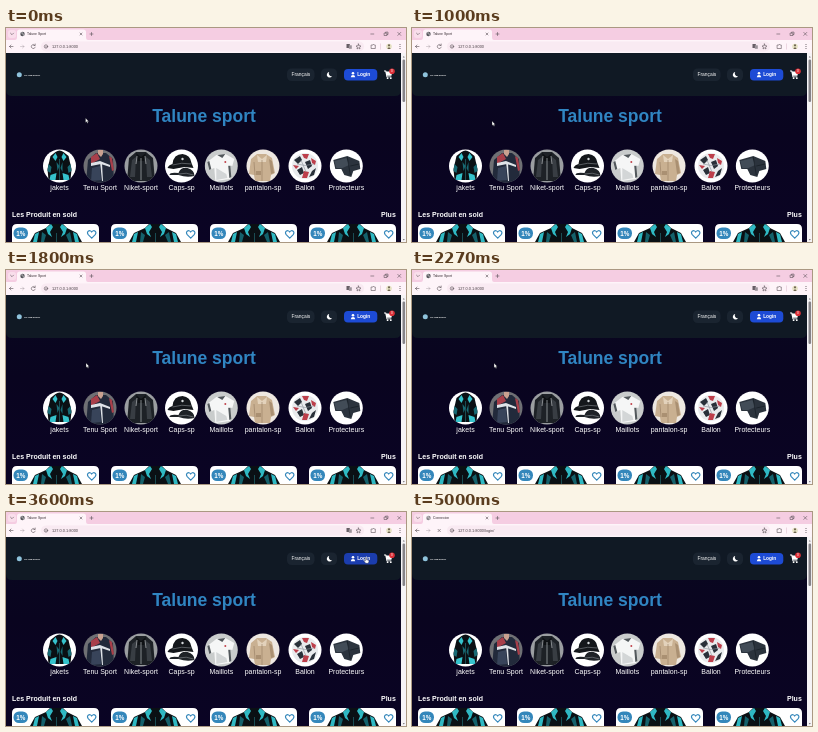
Animation of 400 by 214 pixels, one loop 5070 ms. Source, as an HTML page:

```html
<!DOCTYPE html>
<html lang="fr">
<head>
<meta charset="utf-8">
<title>Talune Sport</title>
<style>
html, body { margin: 0; width: 100%; height: 100%; overflow: hidden; background: #09041f; }
svg { display: block; width: 100vw; height: 100vh; }
text { font-family: "Liberation Sans", Arial, sans-serif; }
.line { fill: none; stroke: #5d5259; stroke-width: .6; stroke-linecap: round; stroke-linejoin: round; }
.label { font-size: 7px; fill: #fff; text-anchor: middle; }
.bold { font-weight: bold; fill: #fff; }
</style>
</head>
<body>
<svg viewBox="0 0 400 214" preserveAspectRatio="none">
  <defs>
    <linearGradient id="page" x2="0" y2="1">
      <stop offset="0" stop-color="#090820"/>
      <stop offset=".5" stop-color="#09041f"/>
      <stop offset="1" stop-color="#0a0424"/>
    </linearGradient>
    <clipPath id="round"><circle r="16.5"/></clipPath>

    <g id="hoodie">
      <rect x="-17" y="-17" width="34" height="34" fill="#fff"/>
      <path fill="#0a1014" d="M-4-14Q0-17 4-14L9-10 12 3 11 14H-11L-12 3-9-10Z"/>
      <path fill="#35c3cc" d="M-4-13L-2-9-4-5-7-9ZM4-13L2-9 4-5 7-9ZM-9 9L-3 7-4 14H-10ZM9 9L3 7 4 14H10Z"/>
      <path fill="#176a74" d="M-11-2L-8 1-9 7-12 5ZM11-2L8 1 9 7 12 5ZM-3-4L0 0-2 5ZM3-4L1 2 3 6Z"/>
      <path stroke="#2b8a92" stroke-width=".5" d="M0-7V14"/>
    </g>
    <g id="tracksuit">
      <rect x="-17" y="-17" width="34" height="34" fill="#6f7074"/>
      <path fill="#222a3b" d="M-4-13H6L13-7 14 17H-14L-12-6Z"/>
      <path fill="#a83f4a" d="M-9-9L-3-13 0-7-9-2ZM9-10L12-8 14 4 12 5Z"/>
      <path fill="#dfe3e8" d="M-9-3L0-5 10-1 10 1 1-2-9 0ZM0-4L2-3 3 15H2Z"/>
      <path fill="#38445a" d="M-8 2L0 0 1 14-9 15Z"/>
      <path fill="#c9a190" d="M-2-16H3V-12L1-9-2-12Z"/>
    </g>
    <g id="jacket">
      <rect x="-17" y="-17" width="34" height="34" fill="#9b9ea1"/>
      <path fill="#1d2126" d="M-5-14H5L12-8 14 15H-14L-12-8Z"/>
      <path fill="#383d43" d="M-9-6L-5-9-6 11-11 11ZM5-9L9-6 11 11 6 11Z"/>
      <path fill="#0e1114" d="M-5-13L0-9 5-13 3-5H-3Z"/>
      <path fill="none" stroke="#b7bbbe" stroke-width=".7" d="M0-8V14M-4-10L-5-2M4-10L5-2"/>
    </g>
    <g id="cap">
      <rect x="-17" y="-17" width="34" height="34" fill="#fff"/>
      <path fill="#14171b" d="M-9-2Q-8-12 1-12 9-11 10-3L12 2 3 1-8 3-14 2Q-13-1-9-2Z"/>
      <path fill="#1e2227" d="M-3 7Q-1 1 6 2 13 4 13 10 5 12-3 9L-12 9Q-12 6-3 7Z"/>
      <path fill="none" stroke="#858a8f" stroke-width=".6" d="M-9-1Q0-4 10-2M-3 8Q5 6 12 9"/>
      <circle cx="1" cy="-7" r="1.2" fill="#d5d9dc"/>
    </g>
    <g id="shirt">
      <rect x="-17" y="-17" width="34" height="34" fill="#c9cccc"/>
      <path fill="#f5f6f6" d="M-5-11L4-12 13-7 11 0 7-1 9 13-6 15-7 2-12 4-14-4Z"/>
      <path fill="#52585c" d="M-4-11L4-12 1-8ZM-14-4L-12 4-10 3-12-5ZM7 0L8 12 10 11 9 0Z"/>
      <path fill="#d3d6d7" d="M-5 2L5 8 6 12-5 14Z"/>
      <circle cx="4" cy="-4" r="1" fill="#c0434c"/>
    </g>
    <g id="beige">
      <rect x="-17" y="-17" width="34" height="34" fill="#eee8e1"/>
      <path fill="#c9b091" d="M-6-12H3L9-8 12 7 8 9 7 15H-8L-9 9-14 8-12-7Z"/>
      <path fill="#e3d2bb" d="M-6-11L-1-7 4-11 3-4-5-4Z"/>
      <path fill="#aa9072" d="M6-7L9-5 11 7 8 8ZM-7 5H-2V9H-7Z"/>
      <path fill="none" stroke="#957d62" stroke-width=".6" d="M-1-6V15M-9-4L-8 9"/>
    </g>
    <g id="ball">
      <rect x="-17" y="-17" width="34" height="34" fill="#fff"/>
      <circle r="13" fill="#e9ebed"/>
      <path fill="#293039" d="M-11-6L-5-10-3-6-7-2ZM0-4L5-6 7 0 3 3ZM-8 4L-3 1-1 7-5 9ZM7 5L11 2 9 9 4 11Z"/>
      <path fill="#bd3f4b" d="M-3-12L4-12 2-7-1-8ZM6-8L11-5 10-1 7-3ZM-12-1L-6 0-9 3ZM-1 5L4 6 2 12-3 12Z"/>
      <path fill="none" stroke="#8b929b" stroke-width=".6" d="M-4-6L1 6M-8-2Q0 1 9-2"/>
    </g>
    <g id="guard">
      <rect x="-17" y="-17" width="34" height="34" fill="#fff"/>
      <path fill="#2b333d" d="M-13-6L1-10 13-5 14 3 7 5 5 11-2 9-5 3-11 3Z"/>
      <path fill="#424c57" d="M-12-5L0-8 3-1-4 2-10 2Z"/>
      <path fill="none" stroke="#161d24" stroke-width=".7" d="M1-9L4 9M4 0L13-2"/>
    </g>
    <g id="top">
      <path fill="#0a1014" d="M18 18L23 9 34 4 38 0H51L55 4 65 9 70 18Z"/>
      <path fill="#2fb9c3" d="M34 4L39 0 41 3 38 8 40 13 36 10ZM55 4L50 0 48 3 51 8 49 13 53 10ZM23 10L27 8 25 18H21ZM65 10L61 8 63 18H67Z"/>
      <path fill="#14616b" d="M30 8L34 11 32 18H29ZM58 8L54 11 57 18H60Z"/>
      <path stroke="#2b8a92" stroke-width=".5" d="M44.5 9V18"/>
    </g>
  </defs>

  <rect width="400" height="214" fill="url(#page)"/>

  <!-- Browser -->
  <rect width="400" height="12" fill="#f5cde2"/>
  <rect y="12" width="400" height="13" fill="#fef4f9"/>
  <path fill="#fef4f9" d="M9 12Q11 12 11 9V4Q11 1.5 14 1.5H77Q80 1.5 80 4V9Q80 12 82 12Z"/>
  <rect x="2" y="2" width="8" height="8" rx="2.5" fill="#f9deeb"/>
  <path class="line" d="M4.5 5.2L6 6.7 7.5 5.2M74 5L76 7M76 5L74 7M84 6H87M85.5 4.5V7.5M364.8 6H367.8M391.8 4.4L394.8 7.4M394.8 4.4L391.8 7.4"/>
  <path class="line" d="M378.5 5H381V7.5H378.5ZM379.5 5V4.1H382V6.5H381"/>
  <g id="icon"><circle cx="16.5" cy="6" r="2.2" fill="#55545a"/><path d="M15 5Q17 4 17 6T18 7" fill="none" stroke="#eee" stroke-width=".6"/></g>
  <text id="tab" x="21" y="7.3" font-size="3.4" fill="#33272e"></text>
  <path class="line" d="M7 18.5H3.5M5 17L3.5 18.5 5 20"/>
  <path class="line" opacity=".4" d="M14.5 18.5H18M16.5 17L18 18.5 16.5 20"/>
  <path id="reload" class="line" d="M28.8 17.2A2 2 0 1 0 29.2 19.2M29.2 16V17.5H27.7"/>
  <path id="stop" class="line" d="M26 17.3L28.4 19.7M28.4 17.3L26 19.7"/>
  <rect x="35" y="13.5" width="323" height="10" rx="5" fill="#f9eaf2"/>
  <circle cx="40" cy="18.5" r="1.7" class="line"/>
  <path class="line" d="M40 18.3V19.3"/>
  <text id="url" x="46" y="19.9" font-size="3.9" fill="#453b41"></text>
  <g id="translate">
    <rect x="340.5" y="16" width="3.3" height="4" fill="#665d64"/>
    <rect x="342.8" y="17.3" width="3" height="3.5" fill="#9c939a"/>
  </g>
  <path class="line" d="M352.5 16L353.2 17.8 355 18 353.6 19.1 354 21 352.5 20 351 21 351.4 19.1 350 18 351.8 17.8Z"/>
  <path class="line" d="M365.5 17H367Q367.5 15.5 368.2 17H369.3V20.5H365.5Z"/>
  <path stroke="#dfc2d1" stroke-width=".6" d="M374.5 15.5V21.5"/>
  <circle cx="383" cy="18.5" r="2.8" fill="#e6e2c4"/>
  <path fill="#6d6350" d="M381.4 21Q383 17.6 384.6 21Z"/><circle cx="383" cy="17.3" r="1.1" fill="#6d6350"/>
  <g fill="#4b4048"><circle cx="394" cy="16.5" r=".5"/><circle cx="394" cy="18.5" r=".5"/><circle cx="394" cy="20.5" r=".5"/></g>

  <!-- Header -->
  <path fill="#101924" d="M0 25H395V62Q395 68 389 68H6Q0 68 0 62Z"/>
  <circle cx="13.3" cy="46.8" r="2.5" fill="#8fc3dc"/>
  <text x="18" y="47.8" font-size="2.1" font-style="italic" class="bold">TALUNE SPORT</text>
  <rect x="281" y="40.5" width="27.5" height="12.5" rx="4.5" fill="#1a2430"/>
  <text x="294.8" y="48.3" font-size="4.9" fill="#fff" text-anchor="middle">Français</text>
  <rect x="315" y="40.5" width="16" height="12.5" rx="4.5" fill="#1a2430"/>
  <path fill="#fff" d="M323.2 44A2.8 2.8 0 1 0 326 48.2A2.8 2.8 0 0 1 323.2 44Z"/>
  <rect id="login" x="338" y="41" width="33.3" height="11.5" rx="4"/>
  <circle cx="347" cy="45.2" r="1.3" fill="#fff"/><path fill="#fff" d="M344.8 49.2Q345 46.9 347 46.9T349.2 49.2Z"/>
  <text x="351.2" y="48.4" font-size="4.8" class="bold">Login</text>
  <path fill="#fff" d="M378 42.5H380L380.5 43.6H386.4L385.4 47.7H381.1L381.3 48.4H385.3V49.3H380.5L379.3 43.4H378Z"/>
  <circle cx="381.6" cy="50.2" r=".9" fill="#fff"/><circle cx="384.8" cy="50.2" r=".9" fill="#fff"/>
  <circle cx="386" cy="43.2" r="2.8" fill="#dc3038"/>
  <text x="386" y="44.4" font-size="3.3" fill="#fff" text-anchor="middle">0</text>

  <text x="198" y="93.8" font-size="17.5" font-weight="bold" fill="#3085c2" text-anchor="middle">Talune sport</text>
  <g id="types"></g>
  <text x="6" y="188.8" font-size="7" class="bold">Les Produit en sold</text>
  <text x="375" y="188.8" font-size="7" class="bold">Plus</text>
  <g id="cards"></g>

  <!-- Scrollbar -->
  <rect x="395" y="25" width="5" height="189" fill="#f6f4f6"/>
  <path fill="#77757a" d="M396.8 29.5L397.8 28 398.8 29.5ZM396.8 211L397.8 212.5 398.8 211Z"/>
  <rect x="396.5" y="31.5" width="2.6" height="42.5" rx="1.2" fill="#858388"/>

  <g id="cursor">
    <path id="arrow" fill="#fff" stroke="#15151a" stroke-width=".35" d="M0 0V4.6L1.1 3.7 1.9 5.3 2.7 4.9 2 3.4H3.3Z"/>
    <path id="hand" fill="#fff" stroke="#15151a" stroke-width=".35" d="M0 .3Q.5-.3 1 .3V2.2L3.2 2.7Q3.8 3 3.6 4L3 5.8H.5L-1.2 3.7Q-1 2.8 0 3.5Z"/>
  </g>
</svg>
<script>
const LOOP = 5070, NAV = 4870;
const $ = id => document.getElementById(id);

const types = [
  [53.5, "hoodie", "jakets"], [94, "tracksuit", "Tenu Sport"],
  [135, "jacket", "Niket-sport"], [175.5, "cap", "Caps-sp"],
  [215.3, "shirt", "Maillots"], [257, "beige", "pantalon-sp"],
  [299, "ball", "Ballon"], [340.3, "guard", "Protecteurs"]
];
$("types").innerHTML = types.map(([x, shape, label]) => `
  <g transform="translate(${x} 138)" clip-path="url(#round)"><use href="#${shape}"/></g>
  <text class="label" x="${x}" y="162.4">${label}</text>`).join("");

$("cards").innerHTML = [0, 1, 2, 3].map(i => `
  <g transform="translate(${6 + 99 * i} 196)">
  <path fill="#fff" d="M0 18V5Q0 0 5 0H82Q87 0 87 5V18Z"/>
  <use href="#top"/>
  <rect x="1.5" y="3.5" width="14.5" height="11.5" rx="5.5" fill="#3487bb"/>
  <text class="bold" x="8.8" y="11.5" font-size="6.3" text-anchor="middle">1%</text>
  <path fill="none" stroke="#3487bb" stroke-width="1.1" d="M79.7 14.2L76.2 10.7Q74.7 8.7 76.2 7.2 78.1 5.8 79.7 8 81.3 5.8 83.2 7.2 84.7 8.7 83.2 10.7Z"/>
  </g>`).join("");

// Pointer path: time, x, y
const path = [
  [0, 79.5, 90], [150, 79.5, 90], [400, 80, 93], [2250, 80, 93],
  [2700, 398.5, 121], [2900, 398.5, 121], [3450, 359.3, 45.5], [LOOP, 359.3, 45.5]
];
const ease = p => p * p * (3 - 2 * p);

function pointAt(t) {
  const i = path.findIndex(k => k[0] > t);
  const [t0, x0, y0] = path[i - 1], [t1, x1, y1] = path[i];
  const p = ease((t - t0) / (t1 - t0));
  return [x0 + (x1 - x0) * p, y0 + (y1 - y0) * p];
}

const show = (id, on) => $(id).setAttribute("visibility", on ? "visible" : "hidden");

function draw(now) {
  const t = now % LOOP;
  const [x, y] = pointAt(t);
  const done = t >= NAV;
  const hover = !done && x > 338 && x < 371 && y > 41 && y < 52;
  $("cursor").setAttribute("transform", `translate(${x} ${y})`);
  show("arrow", !hover && !done);
  show("hand", hover);
  show("reload", !done);
  show("stop", done);
  show("translate", !done);
  $("login").setAttribute("fill", hover ? "#1b3dae" : "#1d4bd5");
  $("tab").textContent = done ? "Connexion" : "Talune Sport";
  $("url").textContent = "127.0.0.1:8000" + (done ? "/login/" : "");
  $("icon").setAttribute("opacity", done ? .7 : 1);
}

const start = performance.now();
function tick() {
  draw(performance.now() - start);
  requestAnimationFrame(tick);
}
tick();
</script>
</body>
</html>
```
